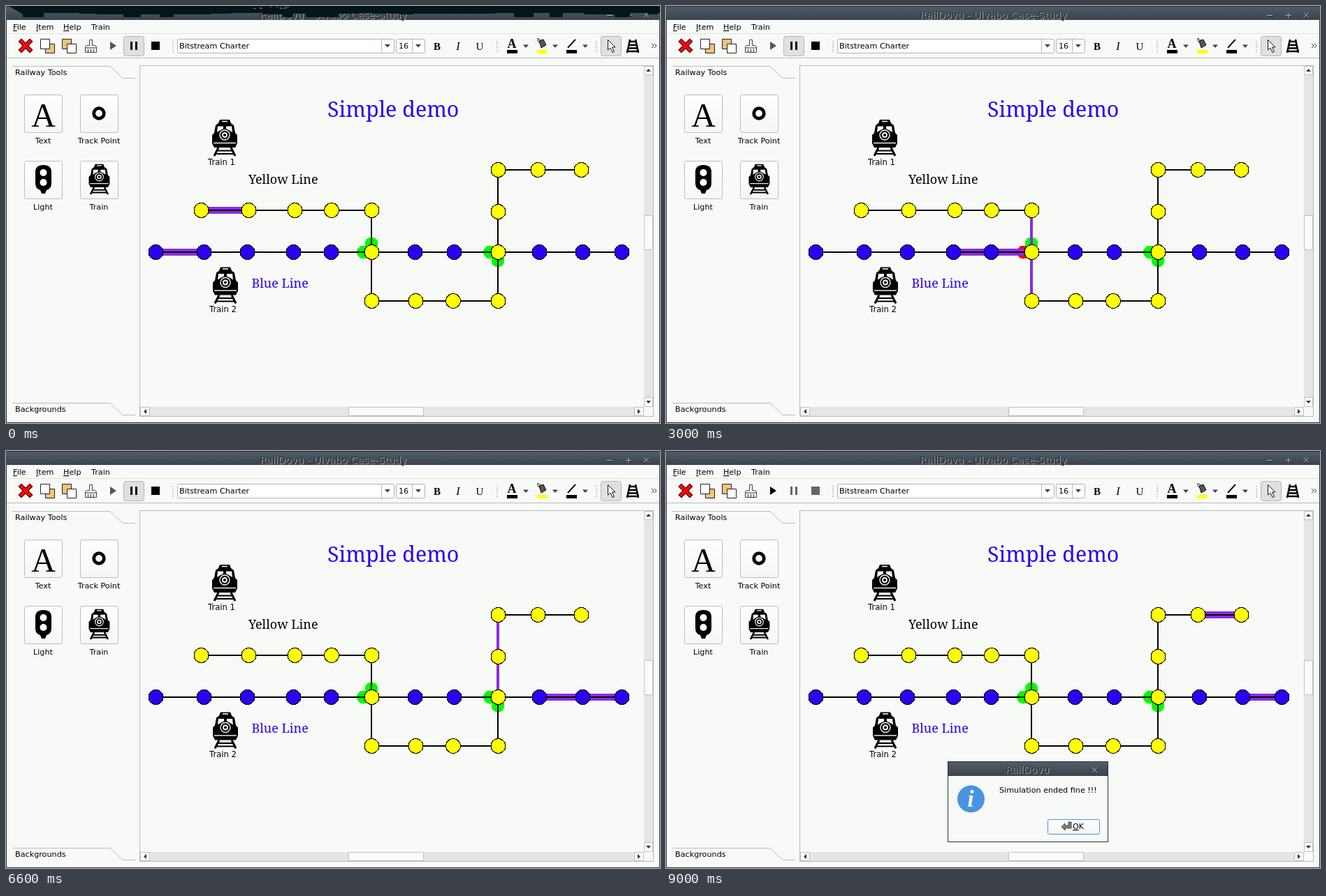
Write an HTML page that moves like this. It is 936x598 px and loops after 9.6 s.

```html
<!DOCTYPE html>
<html lang="en">
<head>
<meta charset="utf-8">
<title>Railway simulation</title>
<style>
  html, body { margin: 0; width: 100%; height: 100%; overflow: hidden; background: #f8faf8; }
  svg { display: block; width: 936px; height: 598px; }
  text { font: 11.2px "DejaVu Sans", sans-serif; fill: #000; white-space: pre; }
  .mid { text-anchor: middle; }
  .title { font-size: 14.1px; text-anchor: middle; fill: #2a3138; }
  .glow { fill: #a5a79f; }
  .scene { font-size: 11.6px; text-anchor: middle; }
  .serif { font: 18px "Noto Serif", serif; }
  .big { font-size: 30.4px; }
  .blue { fill: #2b00f5; }
  .glyph { font: 16px "Liberation Serif", serif; text-anchor: middle; }
  .u { text-decoration: underline; }
  .edge { fill: none; stroke: #b9bbb9; }
  .box { fill: #fff; stroke: #b0b2b0; }
  .down { fill: #dfe0df; stroke: #b4b6b4; }
  .tool { fill: url(#btn); stroke: #bcbebc; }
  .line { fill: none; stroke: #000; stroke-width: 2; }
  .crisp { shape-rendering: crispEdges; }
</style>
</head>
<body>
<svg id="stage" viewBox="0 0 936 598">
  <defs>
    <linearGradient id="bar" x2="0" y2="1">
      <stop offset="0" stop-color="#525d69"/><stop offset="1" stop-color="#3a434c"/>
    </linearGradient>
    <linearGradient id="btn" x2="0" y2="1">
      <stop offset="0" stop-color="#fefefe"/><stop offset="1" stop-color="#f5f6f5"/>
    </linearGradient>
    <path id="arrow" d="M-4 -2H4L0 2.5Z" fill="#444"/>
    <path id="grip" d="M0 50V66" stroke="#b0b0b0" stroke-width="2" stroke-dasharray="1 2"/>
    <g id="train">
      <path d="M9 6L11 1H25L27 6L31 9L33 20L36 23V35L33 41H3L0 35V23L3 20L5 9Z"/>
      <path d="M14 3.5H22" stroke="#f8faf8" stroke-width="1.6"/>
      <path d="M8 10.5H16V14L12 16L7 19ZM28 10.5H20V14L24 16L29 19Z" fill="#f8faf8"/>
      <circle cx="18" cy="23" r="7" stroke="#f8faf8" stroke-width="1.4"/>
      <circle cx="18" cy="23" r="3" fill="none" stroke="#f8faf8" stroke-width="1.8"/>
      <path d="M2 34.5H34" fill="none" stroke="#f8faf8" stroke-width="1.4"/>
      <path d="M9 41L3 53M27 41L33 53" fill="none" stroke="#000" stroke-width="3"/>
      <path d="M7 45.500H29M4 50H32" fill="none" stroke="#000" stroke-width="2.200"/>
    </g>
  </defs>

  <rect width="936" height="598" fill="#f8faf8"/>
  <rect width="936" height="20" fill="url(#bar)"/>
  <path d="M0 .5H936" stroke="#242b31"/>
  <g id="heading"></g>
  <g id="winBtns"></g>
  <path id="tear" fill="#05161a"/>
  <path id="specks" stroke="#587371" fill="none"/>

  <text x="10" y="34"><tspan class="u">F</tspan>ile</text>
  <text x="43" y="34"><tspan class="u">I</tspan>tem</text>
  <text x="82" y="34"><tspan class="u">H</tspan>elp</text>
  <text x="122" y="34">Train</text>
  <path class="edge" d="M1 39.5H935" style="stroke:#dfe1df"/>
  <path class="edge" d="M1 74.5H935"/>

  <path d="M22 51L34 63M34 51L22 63" stroke="#4b0000" stroke-width="6.5" stroke-linecap="square"/>
  <path d="M22 51L34 63M34 51L22 63" stroke="#f00c0c" stroke-width="4.2" stroke-linecap="square"/>
  <g stroke="#222">
    <path d="M56.5 54.5H69.5V67.5H56.5Z" fill="#f4c27a"/>
    <path d="M49.5 47.5H62.5V61.5H49.5Z" fill="#fff"/>
    <path d="M80.5 47.5H93.5V61.5H80.5Z" fill="#f4c27a"/>
    <path d="M87.5 54.5H100.5V67.5H87.5Z" fill="#fff"/>
    <path d="M119.5 48.5H123.5V56.5H127.5Q129.5 57 129.5 60H113.5Q113.5 57 115.5 56.5H119.5ZM113.5 60V66.5H129.5V60M117.5 66V62M121.5 66V62M125.5 66V62" fill="#f1f1f1" stroke="#444"/>
  </g>
  <path id="play" d="M149 51L158 57L149 63Z"/>
  <rect id="pauseBg" class="down" x="168.5" y="43.5" width="29" height="28" rx="3"/>
  <path id="pause" d="M178 51H181V63H178ZM185 51H188V63H185Z"/>
  <path id="stop" d="M208 51H220V63H208Z"/>

  <use href="#grip" x="239"/><use href="#grip" x="703"/><use href="#grip" x="845"/>
  <rect class="box" x="245.5" y="47.5" width="310" height="20" rx="2"/>
  <path class="edge" d="M537.5 48V67"/>
  <use href="#arrow" x="546" y="57"/>
  <text x="248" y="61">Bitstream Charter</text>
  <rect class="box" x="558.5" y="47.5" width="41" height="20" rx="2"/>
  <path class="edge" d="M581.5 48V67"/>
  <use href="#arrow" x="590" y="57"/>
  <text x="562" y="61">16</text>
  <text class="glyph" x="617" y="63" style="font-weight:bold;font-size:15px">B</text>
  <text class="glyph" x="647" y="63" style="font-style:italic">I</text>
  <text class="glyph" x="678" y="63" style="font-size:15px">U</text>
  <text class="glyph" x="724" y="60" style="font-size:18px;font-weight:bold">A</text>
  <path d="M717 63H732V68H717ZM802 63H817V68H802Z"/>
  <path d="M760 63H775V68H760Z" fill="#ff0"/>
  <path d="M763 50L769 48L773 56L766 60Z" fill="#555" stroke="#111"/>
  <path d="M763 52Q760 50 761 46L766 50" fill="none" stroke="#222"/>
  <path d="M804 60L815 48" stroke="#111" stroke-width="2"/>
  <use href="#arrow" x="744" y="57.5"/><use href="#arrow" x="786" y="57.5"/><use href="#arrow" x="829" y="57.5"/>
  <rect class="down" x="851.5" y="43.5" width="29" height="28" rx="3"/>
  <path d="M861.5 48.5V63L865 60L868 66.5L870.5 65.5L867.5 59H872Z" fill="#fff" stroke="#111"/>
  <path d="M893 48L889 67M901 48L905 67M892 51H902M891 56H903M890 60.5H904M888 65H906" stroke="#000" stroke-width="2.5"/>
  <path d="M924 54L927 57L924 60M928 54L931 57L928 60" fill="none" stroke="#333"/>

  <path class="edge" d="M9 86.5H149L167 103.5H185M9 569.5H149L167 586.5H185"/>
  <text x="13" y="99">Railway Tools</text>
  <text x="13" y="582">Backgrounds</text>
  <g id="tools"></g>
  <text class="glyph" x="53.5" y="173" style="font-size:48px">A</text>
  <circle cx="133" cy="154" r="7.3" fill="none" stroke="#000" stroke-width="4.8"/>
  <path d="M42 238Q42 228 53.5 228T65 238V254Q65 262 58 264L56 269H51L49 264Q42 262 42 254Z"/>
  <g fill="#fff">
    <circle cx="53.5" cy="239" r="5"/><circle cx="53.5" cy="253" r="5"/>
  </g>
  <use href="#train" transform="translate(118.5 226) scale(.83)"/>

  <rect class="edge" x="191.5" y="85.5" width="735" height="503"/>
  <path d="M913 86H926V575H913ZM192 575H913V588H192Z" fill="#e4e6e4"/>
  <g fill="#fafcfa" stroke="#c0c2c0">
    <path d="M913.5 86.5H925.5V98.5H913.5ZM913.5 561.5H925.5V574.5H913.5ZM913.5 300.5H925.5V349.5H913.5Z"/>
    <path d="M192.5 575.5H205.5V587.5H192.5ZM899.5 575.5H912.5V587.5H899.5ZM490.5 575.5H597.5V587.5H490.5Z"/>
  </g>
  <path d="M916 94L919.5 90L923 94ZM916 566L919.5 570L923 566ZM201 578L197 581.5L201 585ZM904 578L908 581.5L904 585Z" fill="#333"/>

  <text class="serif big blue" x="460" y="159">Simple demo</text>
  <text class="serif" x="347" y="255">Yellow Line</text>
  <text class="serif blue" x="351.5" y="404">Blue Line</text>
  <use href="#train" x="295" y="162"/>
  <text class="scene" x="308.5" y="228">Train 1</text>
  <use href="#train" x="296" y="373.5"/>
  <text class="scene" x="310.5" y="439">Train 2</text>
  <g class="crisp">
    <g id="lights"></g>
    <g id="cars"></g>
    <g id="tracks"></g>
    <g id="nodes"></g>
  </g>

  <g id="dialog">
    <rect x="403.5" y="445.5" width="229" height="115" fill="#f8faf8" stroke="#2d343b"/>
    <rect x="404" y="446" width="228" height="20" fill="url(#bar)"/>
    <g id="dlgHead"></g>
    <circle cx="436.5" cy="499" r="19.5" fill="#4a93e2"/>
    <text class="glyph" x="436" y="510" style="font-size:33px;font-style:italic;font-weight:bold;fill:#fff">i</text>
    <text x="477" y="490">Simulation ended fine !!!</text>
    <rect x="546.5" y="528.5" width="74" height="21" rx="2" fill="url(#btn)" stroke="#4a93e2"/>
    <path d="M566 539L571 534V537H576V532H580V541H571V544Z" fill="#7c8579" stroke="#454b43"/>
    <text x="582" y="542"><tspan class="u">O</tspan>K</text>
  </g>
  <path d="M.5 20V597.5H935.5V20" fill="none" stroke="#2d343b"/>
</svg>
<script>
const STEP = 600, LOOP = 9600;
const $ = id => document.getElementById(id);

function add(parent, tag, attrs, label) {
  const el = document.createElementNS("http://www.w3.org/2000/svg", tag);
  for (const k in attrs) el.setAttribute(k, attrs[k]);
  if (label) el.textContent = label;
  return parent.appendChild(el);
}

function engraved(parent, x, y, label) {
  add(parent, "text", { x: x + 1, y: y + 1, class: "title glow" }, label);
  add(parent, "text", { x, y, class: "title" }, label);
}

function engravedPath(parent, d) {
  add(parent, "path", { d, stroke: "#1c2228", fill: "none", transform: "translate(1 1)" });
  add(parent, "path", { d, stroke: "#b4b8b8", fill: "none" });
}

engraved($("heading"), 468.5, 18, "RailDovu - Ulvabo Case-Study");
engraved($("dlgHead"), 517, 462, "RailDovu");
engravedPath($("winBtns"), "M860 13.5H868M887 13.5H895M891 9.5V17.5M913 9.5L920 16.5M920 9.5L913 16.5");
engravedPath($("dlgHead"), "M610 454L617 461M617 454L610 461");

["Text", "Track Point", "Light", "Train"].forEach((name, i) => {
  const x = 26.5 + 80 * (i % 2), y = 128 + 95 * (i >> 1);
  add($("tools"), "rect", { class: "tool", x, y: y - .5, width: 54, height: 54, rx: 2 });
  add($("tools"), "text", { class: "mid", x: x + 26.5, y: y + 69 }, name);
});

// Ragged dark strip over the title bar while the window is still being painted
let seed = 7;
const rnd = () => (seed = seed * 16807 % 2147483647) / 2147483647;
let tear = "M4 0L24 12", specks = "";
for (let x = 24; x < 936; x += 8 + rnd() * 24) tear += `H${x | 0}V${rnd() < .2 ? 16 : 10 + (rnd() * 3 | 0)}`;
for (let i = 0; i < 12; i++) specks += `M${354 + rnd() * 50 | 0} ${1.5 + (rnd() * 3 | 0)}h${2 + rnd() * 4 | 0}`;
$("tear").setAttribute("d", tear + "H936V0Z");
$("specks").setAttribute("d", specks);

const yellow = [[279, 293], [347, 293], [413, 293], [465.5, 293], [523, 293], [523, 353],
  [523, 423], [586, 423], [639.5, 423], [704, 423], [704, 353], [704, 295], [704, 235], [761, 235], [823, 235]];
const blue = [214, 283, 345, 411, 465, 523, 585, 641, 704, 763, 825, 881].map(x => [x, 353]);

function makeLine(points, color) {
  add($("tracks"), "polyline", { class: "line", points: points.join(" ") });
  for (const [x, cy] of points)
    add($("nodes"), "circle", { cx: x + .5, cy, r: 10.5, fill: color, stroke: "#000" });
  return points.slice(1).map(([x, y], i) => {
    const [px, py] = points[i], flat = y === py;
    // A train on a vertical track is narrow and hides the rail
    return add($(flat ? "cars" : "tracks"), "path",
      { d: `M${px} ${py}L${x} ${y}`, stroke: "#8a2be2", "stroke-width": flat ? 10 : 4 });
  });
}
const blueCars = makeLine(blue, "#2b00f5");
const yellowCars = makeLine(yellow, "#ff0");

// Each signal turns red while the other line's train spans the junction
const signals = [
  { at: [523, 341], by: "blue", seg: 5 }, { at: [511.5, 353], by: "yellow", seg: 5 },
  { at: [704, 365], by: "blue", seg: 8 }, { at: [692.5, 353], by: "yellow", seg: 10 }
];
for (const s of signals) s.el = add($("lights"), "circle", { cx: s.at[0], cy: s.at[1], r: 9.5 });

const show = (el, on) => el.setAttribute("visibility", on ? "visible" : "hidden");

function place(cars, head) {
  head = Math.min(head, cars.length);
  cars.forEach((c, i) => show(c, i === head || i === head - 1));
  return head;
}

function draw(step) {
  const heads = {
    yellow: place(yellowCars, step),
    blue: place(blueCars, step < 5 ? step : step - 1) // waits one step at the junction
  };
  for (const s of signals) s.el.setAttribute("fill", heads[s.by] === s.seg ? "#f00" : "#0f0");
  const done = step >= 14;
  $("play").setAttribute("fill", done ? "#000" : "#555");
  for (const id of ["pause", "stop"]) $(id).setAttribute("fill", done ? "#666" : "#000");
  show($("pauseBg"), !done);
  show($("tear"), step === 0);
  show($("specks"), step === 0);
  show($("dialog"), step === 15);
}

const start = performance.now();
let last = -1;
function tick() {
  const step = Math.floor((performance.now() - start) % LOOP / STEP);
  if (step !== last) draw(last = step);
  requestAnimationFrame(tick);
}
tick();
</script>
</body>
</html>
```
